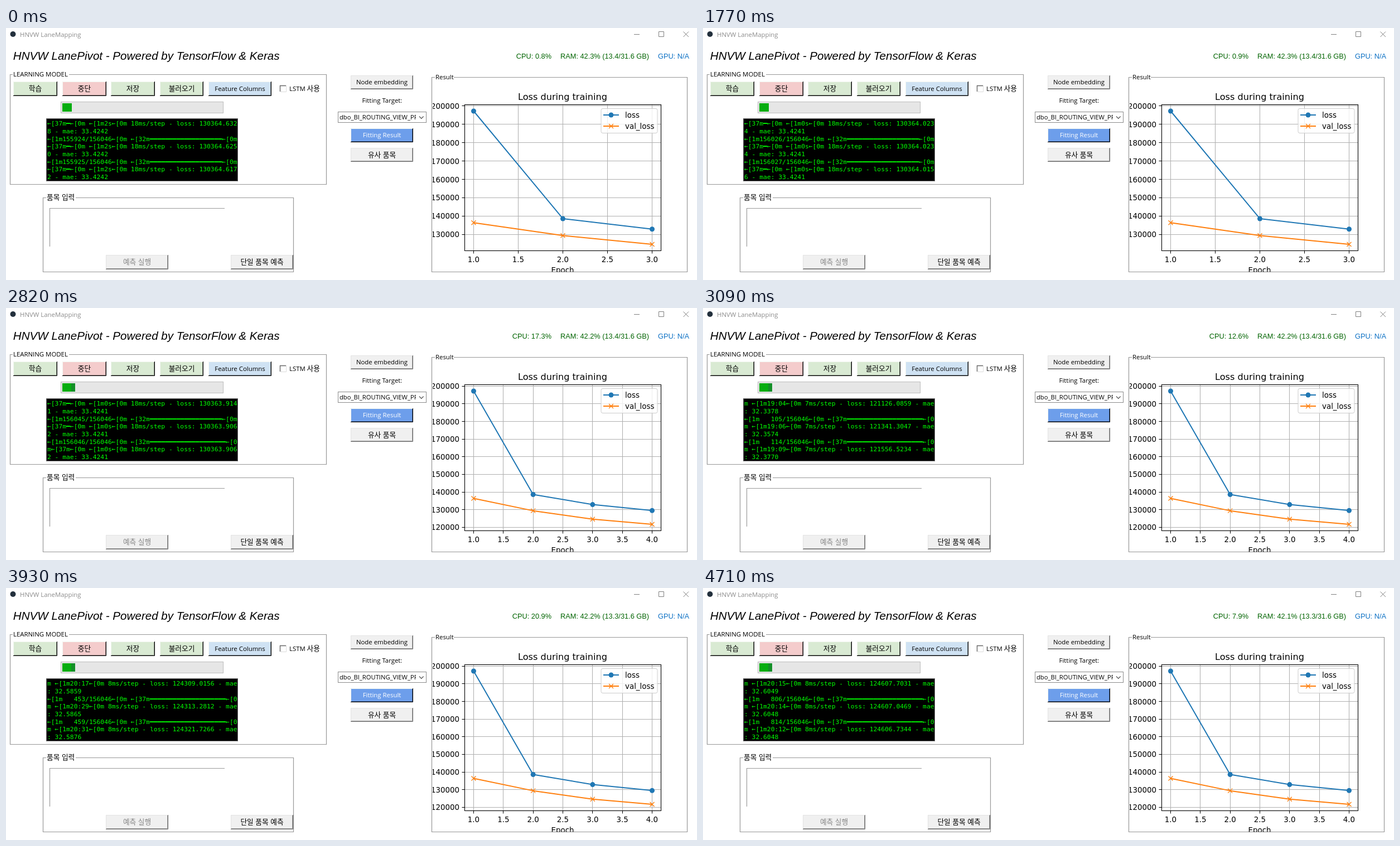
An HTML page that plays this animation: 1239 by 452 pixels, repeating every 4740 ms.

```html
<!DOCTYPE html>
<html lang="ko">
<head>
<meta charset="utf-8">
<title>Training monitor</title>
<style>
html, body { margin: 0; width: 100%; height: 100%; overflow: hidden; background: #fff; }
svg { display: block; }
text { white-space: pre; }
.ui { font: 11.4px "Open Sans", "Noto Sans", sans-serif; }
.ko { font: 12.7px "Noto Sans CJK KR", "Noto Sans CJK", sans-serif; }
.arial { font: 12.77px "Liberation Sans", Arial, sans-serif; }
.plot { font: 13.4px "DejaVu Sans", sans-serif; }
.term { font: 11.32px "DejaVu Sans Mono", monospace; fill: #0f0; }
.mid { text-anchor: middle; }
.end { text-anchor: end; }
</style>
</head>
<body>
<svg id="stage" width="1239" height="452" viewBox="0 0 1239 452">
  <defs>
    <clipPath id="resultClip"><rect x="765" y="89" width="455" height="348.5"/></clipPath>
    <clipPath id="comboClip"><rect x="597" y="151" width="138" height="18"/></clipPath>
  </defs>
</svg>
<script>
const LOOP = 4740, TICK = 30, TOTAL = 156046, COLS = 50;
const stage = document.getElementById('stage');

function add(parent, tag, attrs, content) {
  const el = document.createElementNS('http://www.w3.org/2000/svg', tag);
  for (const k in attrs) el.setAttribute(k, attrs[k]);
  if (content !== undefined) el.textContent = content;
  parent.appendChild(el);
  return el;
}
const rect = (p, x, y, width, height, fill, more) => add(p, 'rect', { x, y, width, height, fill, ...more });
const path = (p, d, stroke, width = 1, more) =>
  add(p, 'path', { d, stroke, 'stroke-width': width, fill: 'none', ...more });
const label = (p, x, y, str, cls, fill = '#000', more) => add(p, 'text', { x, y, class: cls, fill, ...more }, str);

// ---- static window ----
function groupBox(x, y, r, b, title, cls, textX, gapEnd) {
  path(stage, `M${textX - 1} ${y + .5}H${x + .5}V${b - .5}H${r - .5}V${y + .5}H${gapEnd}`, '#979797', 1.2);
  label(stage, textX, y + 4, title, cls);
}

function button(x, y, r, b, fill, str, cls, ink = '#000') {
  const gray = fill === '#f0f0f0';
  rect(stage, x, y, r - x, b - y, fill);
  path(stage, `M${x + .5} ${b - 1}V${y + .5}H${r - 1}`, gray ? '#e3e3e3' : '#f3f7f1');
  path(stage, `M${x + 1} ${b - 1.5}H${r - 1.5}V${y + 1}`, gray ? '#a0a0a0' : '#000', 1, { opacity: gray ? 1 : .45 });
  path(stage, `M${x} ${b - .5}H${r - .5}V${y}`, gray ? '#696969' : '#000');
  label(stage, (x + r) / 2, (y + b) / 2 + (cls === 'ko' ? 4 : 3.5), str, cls + ' mid', ink);
}

function drawWindow() {
  add(stage, 'circle', { cx: 12.5, cy: 11, r: 5, fill: '#23303d' });
  label(stage, 25, 15.5, 'HNVW LaneMapping', 'ui', '#8c8c8c');
  path(stage, 'M1126 11.5H1136M1170.5 6.5H1179.5V15.5H1170.5ZM1214.5 6.5L1224 16M1224 6.5L1214.5 16', '#808080');

  label(stage, 490.5, 57, 'HNVW LanePivot - Powered by TensorFlow & Keras', 'arial end', '#000',
    { style: 'font-size:20.6px;font-style:italic' });
  label(stage, 1225, 55, 'GPU: N/A', 'arial end', '#0b70c4');

  groupBox(7, 83, 575, 281, 'LEARNING MODEL', 'ui', 13, 113);
  groupBox(763, 88, 1222, 438, 'Result', 'ui', 770, 803);
  groupBox(66, 304, 516, 438, '품목 입력', 'ko', 73, 125);

  const green = '#d9ead3', blue = '#cfe2f3', gray = '#f0f0f0';
  button(13, 96, 92, 122, green, '학습', 'ko');
  button(101, 96, 180, 122, '#f4cccc', '중단', 'ko');
  button(188, 96, 267, 122, green, '저장', 'ko');
  button(276, 96, 354, 122, green, '불러오기', 'ko');
  button(363, 96, 476, 122, blue, 'Feature Columns', 'ui');
  button(618, 85, 730, 110, gray, 'Node embedding', 'ui');
  button(618, 180, 730, 205, '#6d9eeb', 'Fitting Result', 'ui', '#fff');
  button(618, 215, 730, 240, gray, '유사 품목', 'ko');
  button(179, 407, 291, 433, gray, '예측 실행', 'ko', '#858585');
  button(403, 407, 515, 433, gray, '단일 품목 예측', 'ko');

  path(stage, 'M491.5 114V103.5H502', '#696969', 1.4);
  path(stage, 'M492 114.5H502.5V103', '#dcdcdc');
  label(stage, 508, 112.5, 'LSTM', 'ui');
  label(stage, 539.5, 112.5, '사용', 'ko');

  label(stage, 674.5, 134, 'Fitting Target:', 'ui mid');
  rect(stage, 595.5, 150.5, 158, 19, '#fff', { stroke: '#8a8a8a' });
  label(stage, 598, 164, 'dbo_BI_ROUTING_VIEW_PF', 'ui', '#000',
    { 'clip-path': 'url(#comboClip)', style: 'font-size:11.2px' });
  path(stage, 'M741 158.5L744.8 162.3L748.6 158.5', '#505050', 1.2);

  path(stage, 'M78.5 392V323.5H392', '#9a9a9a', 1.2);
  rect(stage, 98.5, 132.5, 291, 20, '#e6e6e6', { stroke: '#bcbcbc' });
  rect(stage, 101, 135, 17, 15, '#06ad10');
  rect(stage, 72.5, 162.5, 343, 112, '#000', { stroke: '#6e6e6e' });
}

// ---- loss chart ----
const LOSS = [197260, 138600, 132900, 129500];
const VAL = [136400, 129400, 124600, 121700];
const BLUE = '#1f77b4', ORANGE = '#ff7f0e';
const AX = { l: 822.5, r: 1174.5, t: 137, b: 399.5 };

const dot = (p, x, y) => add(p, 'circle', { cx: x, cy: y, r: 4.5, fill: BLUE });
const cross = (p, x, y) => path(p, `M${x - 4} ${y - 4}l8 8m0 -8l-8 8`, ORANGE, 1.35);

function chart(epochs) {
  const g = add(stage, 'g', { 'clip-path': 'url(#resultClip)' });
  const low = VAL[epochs - 1], high = LOSS[0];
  const px = e => 838.5 + 320 * (e - 1) / (epochs - 1);
  const py = v => 149 + 239 * (high - v) / (high - low);
  const snap = v => Math.floor(v) + .5;

  for (let e = 1; e <= epochs; e += .5) {
    const x = snap(px(e));
    path(g, `M${x} ${AX.t}V${AX.b}`, '#b0b0b0', 1.07);
    path(g, `M${x} ${AX.b}v5`, '#000');
    label(g, px(e), 419.5, e.toFixed(1), 'plot mid');
  }
  for (let v = 200000; v >= low - 3000; v -= 10000) {
    const y = snap(py(v));
    if (y > AX.b) break;
    path(g, `M${AX.l} ${y}H${AX.r}`, '#b0b0b0', 1.07);
    path(g, `M${AX.l} ${y}h-5`, '#000');
    label(g, 813, py(v) + 5, v, 'plot end');
  }
  const series = (data, color, mark) => {
    const pts = data.slice(0, epochs).map((v, i) => [px(i + 1), py(v)]);
    path(g, 'M' + pts.join('L'), color, 2, { 'stroke-linejoin': 'round' });
    pts.forEach(([x, y]) => mark(g, x, y));
  };
  series(LOSS, BLUE, dot);
  series(VAL, ORANGE, cross);
  rect(g, AX.l, AX.t + .5, AX.r - AX.l, AX.b - AX.t - .5, 'none', { stroke: '#000', 'stroke-width': 1.1 });

  label(g, 998, 129, 'Loss during training', 'plot mid', '#000', { style: 'font-size:16.1px' });
  label(g, 998, 439, 'Epoch', 'plot mid');
  rect(g, 1067, 144.5, 101, 44, '#fff', { rx: 3, stroke: '#ccc', 'fill-opacity': .8 });
  path(g, 'M1071 156H1099', BLUE, 2);
  dot(g, 1085, 156);
  path(g, 'M1071 176H1099', ORANGE, 2);
  cross(g, 1085, 176);
  label(g, 1110, 160.5, 'loss', 'plot');
  label(g, 1110, 180.5, 'val_loss', 'plot');
  return g;
}

// ---- console output ----
function interp(keys, x, col = 1) {
  let i = 1;
  while (i < keys.length - 1 && x > keys[i][0]) i++;
  const a = keys[i - 1], b = keys[i];
  const u = Math.max(0, Math.min(1, (x - a[0]) / (b[0] - a[0])));
  return a[col] + (b[col] - a[col]) * u;
}

// float32 resolution, four digits, ties to even
function lossText(v) {
  const k = Math.round(v * 128) / 128 * 1e4;
  let r = Math.round(k);
  if (r - k === .5 && r % 2) r--;
  return (r / 1e4).toFixed(4);
}

const OLD_STEPS = [[0, 155925], [930, 155978], [1770, 156027], [2100, TOTAL]];
const NEW_START = 2880;
const NEW_STEPS = [[NEW_START, 28], [3450, 262], [3930, 459], [4710, 814]];
const GAPS = [[3450, 9], [3930, 6], [4710, 8]];
// step, seconds left, loss, mae
const NEW_STATS = [
  [5, 1122, 118950, 32.14], [120, 1150, 121700, 32.39],
  [244, 1164, 123088.4766, 32.5072], [253, 1154, 123154.2969, 32.5103], [262, 1144, 123213.3906, 32.5121],
  [447, 1217, 124309.0156, 32.5859], [453, 1229, 124313.2812, 32.5865], [459, 1231, 124321.7266, 32.5876],
  [798, 1215, 124607.7031, 32.6049], [806, 1214, 124607.0469, 32.6048], [814, 1212, 124606.7344, 32.6048]
];
const bar = n => '━'.repeat(n);
const head = n => `←[1m${String(n).padStart(6)}/${TOTAL}←[0m `;
const tail = (left, ms, loss, mae) =>
  `←[0m ←[1m${left}←[0m ${ms}ms/step - loss: ${lossText(loss)} - mae: ${mae.toFixed(4)}`;

function oldEntry(n) {
  const done = n === TOTAL ? 20 : 19;
  const left = Math.floor((TOTAL - n) * .018) + 's';
  return `${head(n)}←[32m${bar(done)}←[0m←[37m${bar(20 - done)}` +
    tail(left, 18, 130364.6172 - .0059 * (n - 155925), n < 155950 ? 33.4242 : 33.4241);
}

function newEntry(n) {
  const [sec, loss, mae] = [1, 2, 3].map(c => interp(NEW_STATS, n, c));
  const s = Math.round(sec);
  const left = Math.floor(s / 60) + ':' + String(s % 60).padStart(2, '0');
  return `${head(n)}←[37m${bar(20)}` + tail(left, Math.round(s * 1000 / (TOTAL - n)), loss, mae);
}

function consoleRows(t) {
  const fresh = t >= NEW_START;
  const n = Math.round(interp(fresh ? NEW_STEPS : OLD_STEPS, t));
  const gap = fresh ? Math.round(interp(GAPS, t)) : 1;
  const entry = fresh ? newEntry : oldEntry;
  const rows = [];
  for (let k = 2; k >= 0; k--) {
    const s = entry(n - k * gap);
    for (let i = 0; i < s.length; i += COLS) rows.push(s.slice(i, i + COLS));
  }
  return rows.slice(-8);
}

// ---- usage read-outs: time, cpu, ram %, ram GB ----
const USAGE = [
  [0, 0.8, 42.3, 13.4], [330, 1.2, 42.3, 13.4], [810, 1.6, 42.3, 13.4], [1290, 1.3, 42.3, 13.4],
  [1740, 0.9, 42.3, 13.4], [2340, 17.3, 42.2, 13.4], [2910, 12.6, 42.2, 13.4], [3390, 10.7, 42.3, 13.4],
  [3870, 20.9, 42.2, 13.3], [4290, 14.2, 42.1, 13.3], [4560, 7.9, 42.1, 13.3]
];

drawWindow();
const charts = [chart(3), chart(4)];
const partial = rect(stage, 117, 135, 7, 15, '#148f28');
const rows = Array.from({ length: 8 }, (_, i) => label(stage, 74, 175.3 + i * 13.64, '', 'term', '#0f0'));
const cpu = label(stage, 978, 55, '', 'arial end', '#006400');
const ram = label(stage, 1153, 55, '', 'arial end', '#006400');

function draw(t) {
  const later = t >= 2760;
  charts[0].style.display = later ? 'none' : '';
  charts[1].style.display = partial.style.display = later ? '' : 'none';
  consoleRows(t).forEach((s, i) => { rows[i].textContent = s; });
  const [, load, pct, gb] = USAGE.filter(u => u[0] <= t).pop();
  cpu.textContent = `CPU: ${load.toFixed(1)}%`;
  ram.textContent = `RAM: ${pct.toFixed(1)}% (${gb.toFixed(1)}/31.6 GB)`;
}

const start = performance.now();
let shown = 0;
function frame() {
  const t = Math.floor((performance.now() - start) % LOOP / TICK) * TICK;
  if (t !== shown) draw(shown = t);
  requestAnimationFrame(frame);
}
draw(0);
requestAnimationFrame(frame);
</script>
</body>
</html>
```
